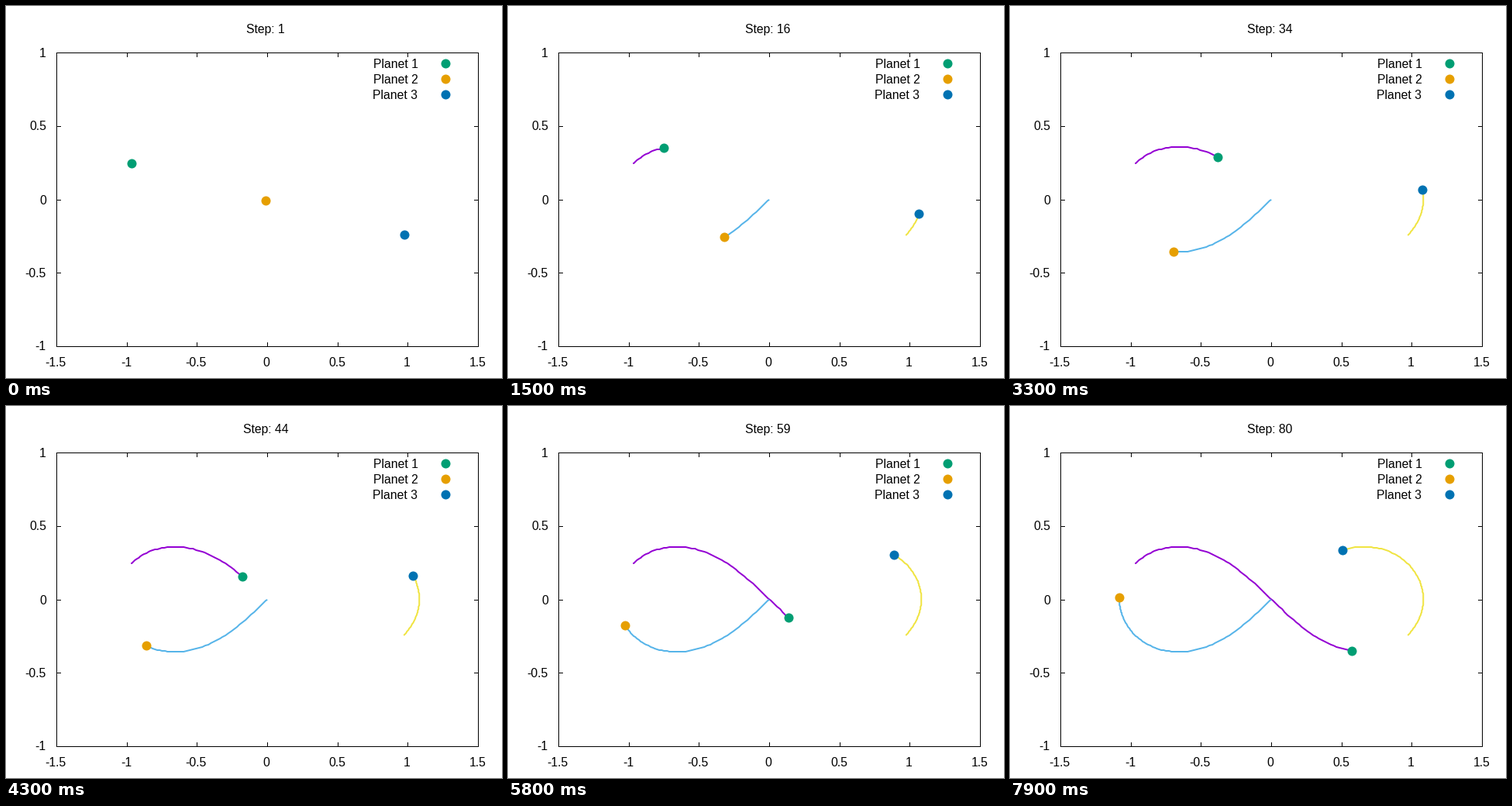
A matplotlib script that plays this animation: 640 px wide and 480 px high, repeating every 8000 ms.

```python
import numpy as np
import matplotlib.pyplot as plt
from matplotlib.animation import FuncAnimation
from matplotlib.patches import Circle

W, H, DPI = 640, 480, 100
PX = 72 / DPI
LEFT, RIGHT, TOP, BOTTOM = 65, 609, 60, 439
TICK = 5
STEPS = 80
PERIOD = 6.32591398
TRAILS = ["#9400d3", "#56b4e9", "#f0e442"]
DOTS = ["#009e73", "#e69f00", "#0072b2"]


def to_px(x, y):
    px = LEFT + (np.asarray(x) + 1.5) / 3 * (RIGHT - LEFT)
    py = BOTTOM - (np.asarray(y) + 1) / 2 * (BOTTOM - TOP)
    return np.floor(px + 0.5), np.floor(py + 0.5)


def accel(p):
    d = p[None] - p[:, None]
    r = np.sqrt((d ** 2).sum(-1)) + np.eye(3)
    return (d / r[..., None] ** 3).sum(1)


def deriv(s):
    return np.array([s[1], accel(s[0])])


def figure_eight(t_end, h):
    """Three equal masses chasing each other on a figure-eight orbit."""
    p = np.array([[-0.97000436, 0.24308753], [0, 0], [0.97000436, -0.24308753]])
    v = np.array([-0.93240737, -0.86473146])
    s = np.array([p, [-v / 2, v, -v / 2]])
    path = [s[0]]
    for _ in range(int(round(t_end / h))):
        k1 = deriv(s)
        k2 = deriv(s + h / 2 * k1)
        k3 = deriv(s + h / 2 * k2)
        k4 = deriv(s + h * k3)
        s = s + h / 6 * (k1 + 2 * k2 + 2 * k3 + k4)
        path.append(s[0])
    return np.array(path)


# Steps are longer when the bodies line up, shorter when two come close.
h = 0.002
orbit = figure_eight(1.7, h)
t = np.arange(len(orbit)) * h
w = 12 * np.pi / PERIOD
step_at = 0.54 + 49.3 * t - 0.65 * np.sin(w * t) - 0.18 * np.sin(2 * w * t)
times = np.interp(np.arange(STEPS + 1), step_at, t)
times[0] = 0
paths = []
for body in range(3):
    xy = [np.interp(times, t, orbit[:, body, k]) for k in (0, 1)]
    paths.append(to_px(*xy))

plt.rcParams["font.family"] = "Liberation Sans"
fig = plt.figure(figsize=(W / DPI, H / DPI), dpi=DPI, facecolor="white")
ax = fig.add_axes([0, 0, 1, 1])
ax.set_xlim(0, W)
ax.set_ylim(H, 0)
ax.axis("off")


def line(xs, ys):
    ax.plot(np.array(xs) + 0.5, np.array(ys) + 0.5, color="black", lw=PX,
            solid_capstyle="projecting", solid_joinstyle="miter",
            snap=False, zorder=1)


def label(x, y, s, ha):
    return ax.text(x, y, s, ha=ha, va="baseline", fontsize=15.7 * PX, color="black")


def dot(x, y, color, z):
    return ax.add_patch(Circle((x + 0.5, y + 0.5), 6, fc=color, ec="none",
                               snap=False, zorder=z))


line([LEFT, RIGHT, RIGHT, LEFT, LEFT], [TOP, TOP, BOTTOM, BOTTOM, TOP])
for v in np.arange(-1.5, 1.6, 0.5):
    x = float(to_px(v, 0)[0])
    line([x, x], [BOTTOM, BOTTOM - TICK])
    line([x, x], [TOP, TOP + TICK])
    label(x - 0.8, 465, f"{v:g}", "center")
for v in np.arange(-1, 1.1, 0.5):
    y = float(to_px(0, v)[1])
    line([LEFT, LEFT + TICK], [y, y])
    line([RIGHT, RIGHT - TICK], [y, y])
    label(51.8, y + 5.5, f"{v:g}", "right")

title = label(335.3, 35.5, "", "center")
trails, dots = [], []
for i in range(3):
    y = 74 + 20 * i
    label(531.4, y + 5.5, f"Planet {i + 1}", "right")
    dot(567, y, DOTS[i], 2)
    trails += ax.plot([], [], color=TRAILS[i], lw=2 * PX, snap=False,
                      solid_capstyle="butt", zorder=3 + 2 * i)
    dots.append(dot(0, 0, DOTS[i], 4 + 2 * i))


def draw(frame):
    n = frame + 1
    title.set_text(f"Step: {n}")
    for (x, y), trail, mark in zip(paths, trails, dots):
        trail.set_data(x[:n + 1] + 0.25, y[:n + 1])
        mark.center = (x[n] + 0.5, y[n] + 0.5)
    return [title, *trails, *dots]


anim = FuncAnimation(fig, draw, frames=STEPS, interval=100, repeat=True,
                     repeat_delay=0, blit=False)
plt.show()
```
